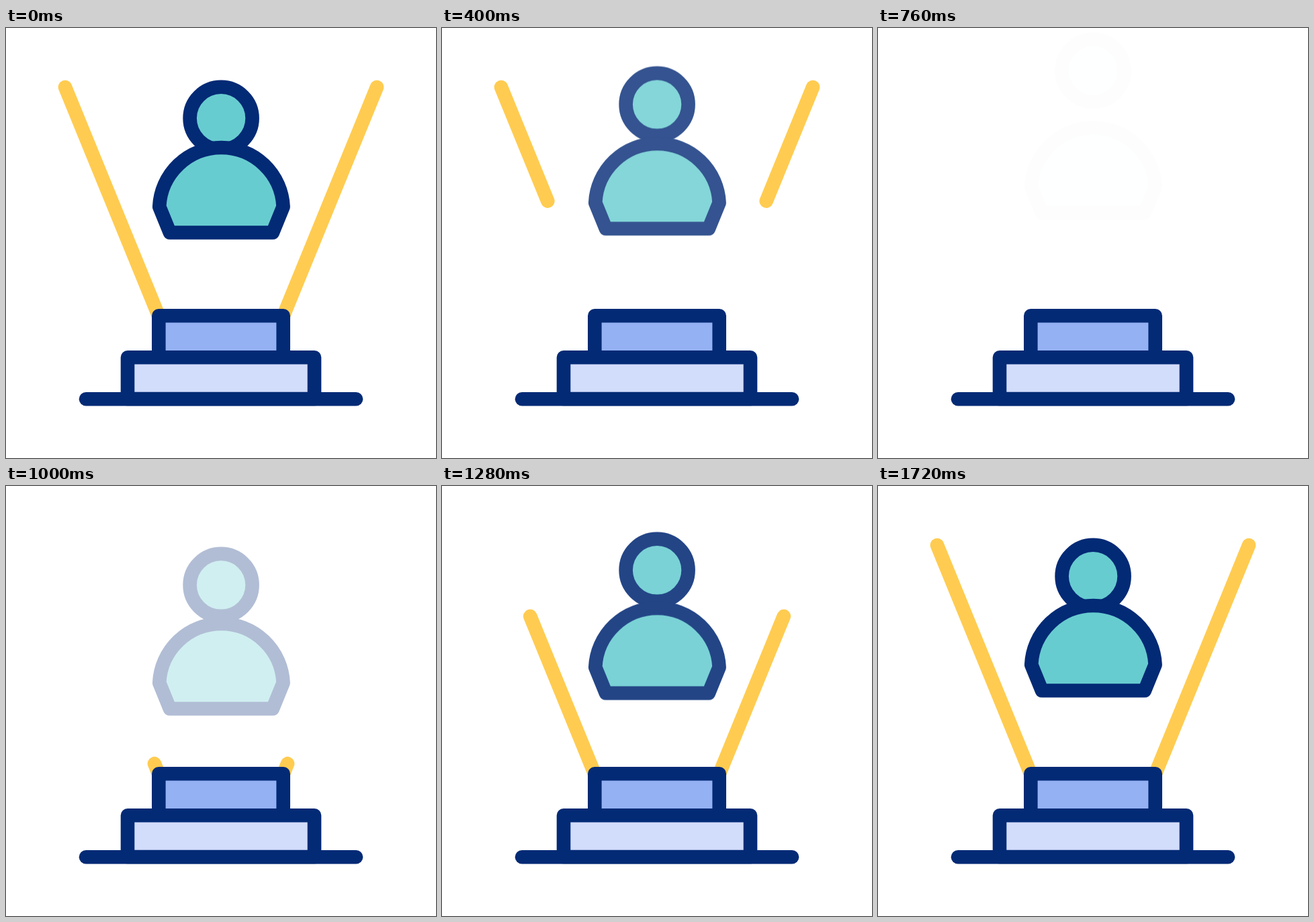
Recreate the animation shown at these times as an HTML page without scripts. Size 640x640 px, loop 1.76 s.

```html
<!DOCTYPE html>
<html lang="en">
<head>
<meta charset="utf-8">
<title>Hologram</title>
<style>
  html, body { margin: 0; width: 100%; height: 100%; overflow: hidden; background: #fff; }
  svg { display: block; width: 100%; height: 100%; }

  .outline { stroke: #032a75; stroke-width: 20.6; stroke-linecap: round; stroke-linejoin: round; }
  .teal { fill: #67ccd0; }
  .beam {
    fill: none; stroke: #ffcc51; stroke-width: 20.6; stroke-linecap: round;
    stroke-dasharray: 1 3;
  }

  .beam, .person, .fade, .head { animation: 1760ms linear infinite; }
  .beam { animation-name: beam; }
  .person { animation-name: lift; }
  .fade { animation-name: fade; }
  .head { animation-name: pop; }

  /* Beams shrink to their tips, then grow again from the base. */
  @keyframes beam {
    0%, 7.16% { stroke-dashoffset: 0; }
    7.16% { animation-timing-function: cubic-bezier(.333, 0, .667, 1); }
    38.3%, 40.6% { stroke-dashoffset: .999; }
    40.61%, 52.94% { stroke-dashoffset: 2; }
    52.95% { stroke-dashoffset: -.999; animation-timing-function: cubic-bezier(.333, 0, .667, 1); }
    84.5%, 100% { stroke-dashoffset: 0; }
  }

  @keyframes lift {
    0%, 13.64% { transform: translateY(0); }
    13.64% { animation-timing-function: cubic-bezier(.45, 0, .7, .5); }
    22.73% { transform: translateY(-5.8px); }
    34.09% { transform: translateY(-19.4px); }
    38.64% { transform: translateY(-25.7px); }
    40.91% { transform: translateY(-28.5px); }
    43.18%, 52.26% { transform: translateY(-29.5px); }
    52.27% { transform: translateY(41.3px); animation-timing-function: cubic-bezier(.256, 1, .488, 1); }
    97.73%, 100% { transform: translateY(0); }
  }

  @keyframes fade {
    0%, 13.64% { opacity: 1; }
    13.64% { animation-timing-function: cubic-bezier(.45, 0, .7, .5); }
    22.73% { opacity: .807; }
    34.09% { opacity: .397; }
    38.64% { opacity: .17; }
    40.91% { opacity: .07; }
    43.18%, 52.26% { opacity: .01; }
    52.27% { opacity: 0; animation-timing-function: cubic-bezier(.29, 1, .59, 1); }
    97.73%, 100% { opacity: 1; }
  }

  /* The head moves away from the shoulders on top of the shared lift. */
  @keyframes pop {
    0%, 13.98% { transform: translateY(0); }
    13.98%, 52.27%, 64.2% { animation-timing-function: cubic-bezier(.333, 0, .667, 1); }
    38.64%, 52.26% { transform: translateY(-41.3px); }
    52.27% { transform: translateY(0); }
    64.2% { transform: translateY(-36px); }
    77.56%, 100% { transform: translateY(0); }
  }
</style>
</head>
<body>
<svg viewBox="0 0 640 640">
  <path class="beam" pathLength="1" d="M88 88L227 428"/>
  <path class="beam" pathLength="1" d="M552 88L413 428"/>

  <g class="outline">
    <path fill="#94b1f3" d="M227.3 490V428.3H412.7V490"/>
    <path fill="#d2dcfb" d="M181 552V490.3H459V552Z"/>
    <path d="M119 552.2H521"/>
  </g>

  <g class="fade">
    <g class="person outline teal">
      <circle class="head" cx="320.1" cy="134.3" r="46.5"/>
      <path d="M228.2 266A92.3 92.3 0 0 1 412.6 266L396.9 304.5H243.9Z"/>
    </g>
  </g>
</svg>
</body>
</html>
```
